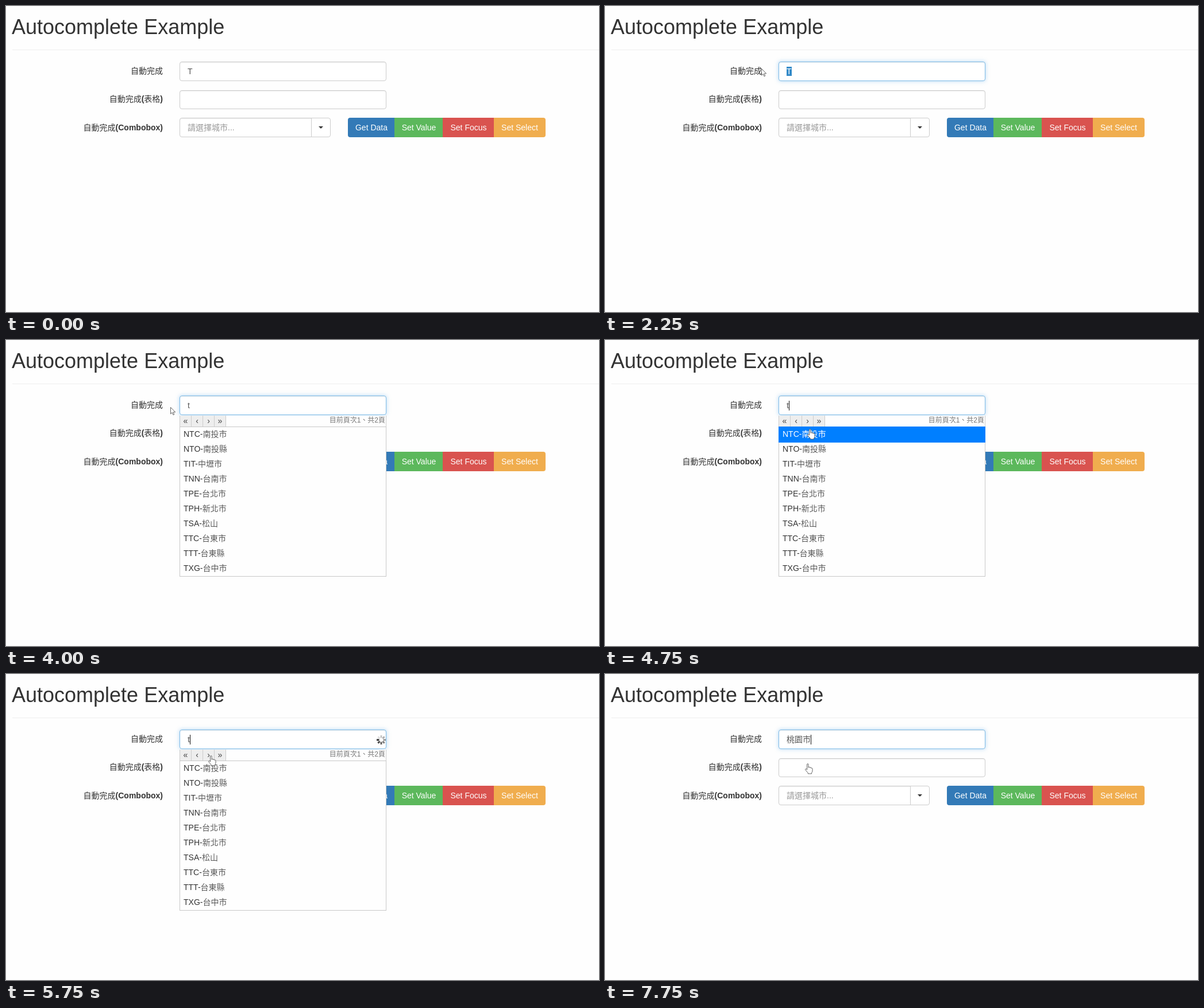
These frames come from a looping animation (1032 by 534 pixels, 8000 ms). An HTML page:

```html
<!DOCTYPE html>
<html lang="zh-Hant">
<head>
<meta charset="utf-8">
<title>Autocomplete</title>
<style>
html, body { margin: 0; width: 100%; height: 100%; overflow: hidden; background: #fefefe; }
body { position: relative; color: #333; font: 14px/20px "Liberation Sans", Arial, "Noto Sans CJK TC", "Noto Sans CJK", sans-serif; }
div, h1, svg, i { position: absolute; box-sizing: border-box; margin: 0; white-space: pre; }
h1 { left: 10px; top: 16px; font-size: 36px; line-height: 41px; font-weight: 400; }
hr { position: absolute; left: 11px; right: 0; top: 76px; margin: 0; border: 0; border-top: 1px solid #eee; }
.label { right: calc(100% - 273px); font-weight: 500; }
.label b { font-weight: 700; }
.field { left: 302px; width: 360px; height: 34px; padding: 6px 12px 6px 13px; border: 1px solid #ccc; border-radius: 4px;
  background: #fff; color: #555; font-weight: 300; box-shadow: inset 0 1px 1px rgba(0,0,0,.075); }
.focus { border-color: #7fbbe6; box-shadow: inset 0 1px 1px rgba(0,0,0,.075), 0 0 7px rgba(102,175,233,.5); }
.hint { color: #999; }
.btn { top: 195px; height: 34px; padding-top: 7px; color: #fff; text-align: center; }
#toggle { left: 531px; top: 195px; width: 34px; height: 34px; border: 1px solid #ccc; border-radius: 0 4px 4px 0; background: #fff; }
#toggle::after { content: ""; position: absolute; left: 12px; top: 14px; border: 4px solid transparent; border-top-color: #333; border-bottom: 0; }
.sel { background: #338ac8; color: #fff; }
#caret { top: 8px; width: 1px; height: 17px; background: #111; }
#pager { left: 302px; top: 132px; width: 360px; height: 20px; background: #fefefe; border: 1px solid #ccc; border-width: 0 1px; }
#pager div { top: 0; width: 20px; height: 20px; border-right: 1px solid #ccc; background: #eee; line-height: 19px; text-align: center; color: #444; }
#pager #count { left: auto; right: 1px; width: auto; border: 0; background: none; font-size: 12px; font-weight: 300; line-height: 16px; color: #777; }
#list { left: 302px; top: 151px; width: 360px; border: 1px solid #c8c8c8; background: #fefefe; font-weight: 300; }
#list div { left: -1px; width: 360px; height: 28px; padding: 3px 0 0 7px; }
#list span { opacity: .8; }
#list .hover { background: #007fff; color: #fff; }
#list .hover span { opacity: 1; }
[hidden] { display: none !important; }
svg { overflow: visible; }
</style>
</head>
<body>
<h1>Autocomplete Example</h1>
<hr>
<div class="label" style="top:103px">自動完成</div>
<div class="label" style="top:152px">自動完成<b>(</b>表格<b>)</b></div>
<div class="label" style="top:202px">自動完成<b>(Combobox)</b></div>
<div class="field" id="input" style="top:97px"><span id="value"></span><i id="caret"></i></div>
<div class="field" style="top:147px;height:33px"></div>
<div class="field hint" style="top:195px;width:240px">請選擇城市...</div>
<div id="toggle"></div>
<div id="buttons"></div>
<div id="popup">
  <div id="pager"><div id="count"></div></div>
  <div id="list"></div>
</div>
<svg id="spinner" style="left:653px;top:115px;transform-origin:0 0" width="1" height="1" stroke-width="3"></svg>
<svg id="cursor" width="16" height="20" fill="#fff" stroke="#555" stroke-width=".9" stroke-linejoin="round">
  <path id="arrow" d="M.5.5V12L3.2 9.5 5 13.8 6.8 13 5 8.9H8.7Z"/>
  <path id="beam" fill="none" d="M-3-8Q0-8 0-6V6Q0 8-3 8M3-8Q0-8 0-6M0 6Q0 8 3 8"/>
  <path id="hand" d="M3.6 11V2Q3.6.6 4.8.6T6 2V7.4Q6.2 6 7.4 6.2T8.5 7.8Q8.8 6.6 9.9 7T10.9 8.5Q11.6 7.6 12.4 8.2T13 9.8V13Q13 15 11.6 16.3V18H5.2V16.5L1 11.7Q0 10.4 1 9.7T3.6 11Z"/>
</svg>
<script>
const $ = id => document.getElementById(id);
const LOOP = 8000;
const pages = [[], [
  "NTC-南投市", "NTO-南投縣", "TIT-中壢市", "TNN-台南市", "TPE-台北市",
  "TPH-新北市", "TSA-松山", "TTC-台東市", "TTT-台東縣", "TXG-台中市"
], ["TYC-桃園市"]];

function add(parent, html, css, cls = "") {
  const el = document.createElement("div");
  el.innerHTML = html;
  el.style.cssText = css;
  el.className = cls;
  return parent.appendChild(el);
}

// label, left, width, fill, corner radius
[
  ["Get Data", 595, 82, "#337ab7", "4px 0 0 4px"],
  ["Set Value", 676, 85, "#5cb85c", "0"],
  ["Set Focus", 760, 90, "#d9534f", "0"],
  ["Set Select", 849, 90, "#f0ad4e", "0 4px 4px 0"]
].forEach(([text, x, w, fill, r]) =>
  add($("buttons"), text, `left:${x}px;width:${w}px;background:${fill};border-radius:${r}`, "btn"));

["«", "‹", "›", "»"].forEach((c, i) => add($("pager"), c, `left:${i * 20}px`));

$("spinner").innerHTML = Array.from({ length: 8 }, (_, i) =>
  `<path d="M0-3.5V-8" stroke="#333" opacity="${(1 - i * .12).toFixed(2)}" transform="rotate(${-i * 45})"/>`).join("");

// Each step changes only the listed parts of the state.
const steps = [
  [0, { text: "T", focus: false, sel: false, caret: false, page: 0, hover: false, spin: false, cursor: "", at: [0, 0] }],
  [750, { cursor: "arrow", at: [470, 214] }],
  [1000, { at: [410, 182] }],
  [1250, { cursor: "beam", at: [350, 116] }],
  [1500, { focus: true, caret: true, at: [336, 115] }],
  [1750, { at: [328, 114] }],
  [2000, { sel: true, caret: false, cursor: "arrow", at: [287, 110] }],
  [2250, { at: [272, 109] }],
  [2500, { at: [275, 111] }],
  [2750, { at: [280, 114] }],
  [3000, { at: [286, 117] }],
  [3250, { text: "t", sel: false, caret: true }],
  [3500, { spin: true }],
  [3750, { spin: false, page: 1 }],
  [4000, { caret: false }],
  [4500, { caret: true, at: [297, 126] }],
  [4750, { cursor: "hand", hover: true, at: [352, 155] }],
  [5000, { at: [378, 156] }],
  [5250, { hover: false, caret: false, at: [362, 143] }],
  [5500, { at: [352, 142] }],
  [5750, { spin: true, caret: true }],
  [6000, { spin: false, page: 2 }],
  [6250, { caret: false }],
  [6750, { caret: true }],
  [7000, { at: [350, 142] }],
  [7250, { hover: true, at: [348, 156] }],
  [7500, { text: "桃園市", page: 0, hover: false, caret: false }],
  [7750, { caret: true }]
];

function draw(t) {
  const s = Object.assign({}, ...steps.filter(([start]) => start <= t).map(([, change]) => change));
  $("value").textContent = s.text;
  $("value").className = s.sel ? "sel" : "";
  $("input").classList.toggle("focus", s.focus);
  $("caret").hidden = !s.caret;

  $("popup").hidden = !s.page;
  const rows = pages[s.page];
  $("count").textContent = `目前頁次${s.page}、共2頁`;
  $("list").style.height = rows.length * 26 + (s.page === 2 ? 3 : 2) + "px";
  $("list").replaceChildren();
  rows.forEach((row, i) => {
    const [code, city] = row.split("-");
    add($("list"), `${code}-<span>${city}</span>`, `top:${i * 26 - 1}px`, s.hover && i === 0 ? "hover" : "");
  });

  $("spinner").toggleAttribute("hidden", !s.spin);
  $("spinner").style.transform = `rotate(${315 + Math.floor(t / 250) % 8 * 45}deg)`;

  for (const shape of $("cursor").children) shape.toggleAttribute("hidden", shape.id !== s.cursor);
  $("cursor").style.left = s.at[0] + "px";
  $("cursor").style.top = s.at[1] + "px";
}

function tick() {
  draw(performance.now() % LOOP);
  requestAnimationFrame(tick);
}
tick();
</script>
</body>
</html>
```
